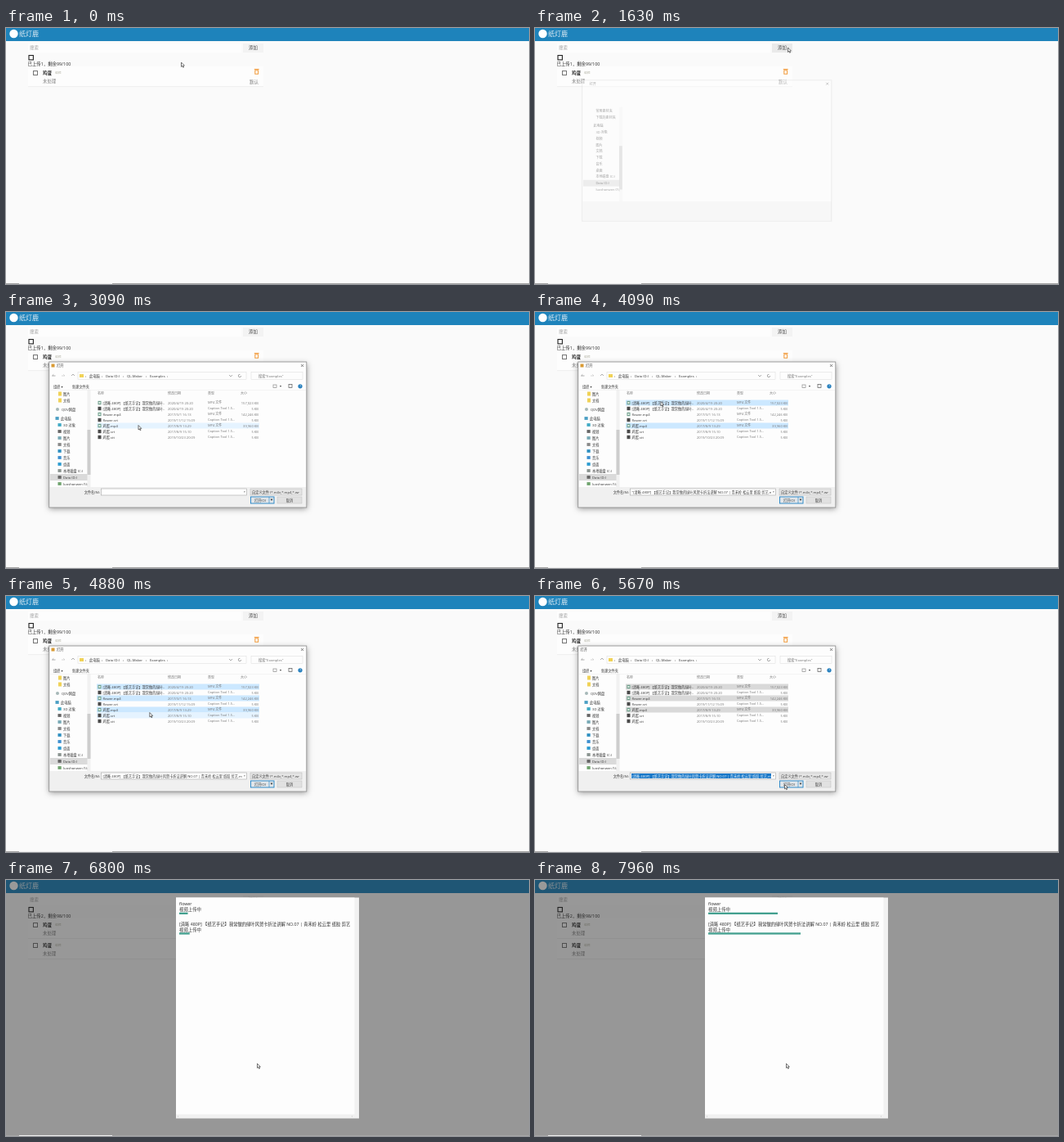
An HTML page with a canvas that plays this animation: 640 px wide and 313 px high, repeating every 8 s.

```html
<!DOCTYPE html>
<html lang="zh">
<head>
<meta charset="utf-8">
<style>
html, body { margin: 0; width: 100%; height: 100%; overflow: hidden; background: #fafafa; }
canvas { display: block; width: 100vw; height: 100vh; }
</style>
</head>
<body>
<canvas id="stage" width="640" height="313"></canvas>
<script>
const ctx = document.getElementById('stage').getContext('2d');
const LOOP = 8000;
const PAGE = '#fafafa', INK = '#3a3a3a', SOFT = '#777', TEAL = '#43a08f', ORANGE = '#f29a38';
const FONT = '"Open Sans", "Noto Sans CJK SC", "Noto Sans CJK", sans-serif';
const TITLE = '[清晰 480P] 【纸艺手记】我常做的绿叶风贺卡折法讲解 NO.07 | 青禾岭 松云里 纸胶 剪艺';

// time, x, y of the pointer tip
const PATH = [
  [40, 214.5, 42], [500, 306, 23], [1080, 306, 23], [1130, 309.5, 24],
  [2130, 309.5, 24], [2880, 162, 138.5], [3250, 162, 138.5], [3720, 154, 109],
  [4050, 154, 109], [4450, 150, 125], [4700, 150, 125], [5400, 305.5, 230.5],
  [5950, 305.5, 230.5], [6200, 307.5, 224.5]
];
const CLICKS = { egg: 3200, paper: 3900, flower: 4560, open: 5500 };
const SHOW = { start: 1590, end: 1750, filled: 1900, close: 5740 };
const EGG_DONE = 6700;

const clamp = v => Math.max(0, Math.min(1, v));
const span = (t, a, b) => clamp((t - a) / (b - a));
const mix = (a, b, p) => a + (b - a) * p;
const smooth = p => p * p * (3 - 2 * p);

function rect(x, y, w, h, fill) {
  ctx.fillStyle = fill;
  ctx.fillRect(x, y, w, h);
}

function frame(x, y, w, h, color, width = 0.7) {
  ctx.strokeStyle = color;
  ctx.lineWidth = width;
  ctx.strokeRect(x, y, w, h);
}

function line(points, color, width = 0.6) {
  ctx.strokeStyle = color;
  ctx.lineWidth = width;
  ctx.beginPath();
  points.forEach(([x, y]) => ctx.lineTo(x, y));
  ctx.stroke();
}

function dot(x, y, r, fill) {
  ctx.fillStyle = fill;
  ctx.beginPath();
  ctx.arc(x, y, r, 0, Math.PI * 2);
  ctx.fill();
}

// y is the optical middle of the line
function text(s, x, y, size = 4.2, color = INK, align = 'left', weight = 400) {
  ctx.font = `${weight} ${size}px ${FONT}`;
  ctx.textAlign = align;
  ctx.fillStyle = color;
  ctx.fillText(s, x, y + size * 0.37);
}

function clipped(x, y, w, h, draw) {
  ctx.save();
  ctx.beginPath();
  ctx.rect(x, y, w, h);
  ctx.clip();
  draw();
  ctx.restore();
}

function pointerAt(t) {
  if (t <= PATH[0][0]) return PATH[0].slice(1);
  for (let i = 1; i < PATH.length; i++) {
    const [t0, x0, y0] = PATH[i - 1], [t1, x1, y1] = PATH[i];
    if (t < t1) {
      const p = smooth(span(t, t0, t1));
      return [mix(x0, x1, p), mix(y0, y1, p)];
    }
  }
  return PATH[PATH.length - 1].slice(1);
}

function drawPointer([x, y]) {
  const shape = [[0, 0], [0, 5.4], [1.3, 4.3], [2.2, 6.3], [3, 5.9], [2.2, 4], [3.8, 3.9]];
  ctx.beginPath();
  shape.forEach(([dx, dy]) => ctx.lineTo(x + dx, y + dy));
  ctx.closePath();
  ctx.fillStyle = '#fff';
  ctx.fill();
  ctx.strokeStyle = '#444';
  ctx.lineWidth = 0.75;
  ctx.stroke();
}

function drawCard(y) {
  rect(27, y, 288, 25, '#fdfdfd');
  rect(27, y + 24.5, 288, 0.6, '#e4e4e4');
  frame(33.5, y + 5.5, 5, 5, '#757575', 1);
  text('鸡蛋', 45, y + 8, 5.4, '#222', 'left', 700);
  text('编辑', 60, y + 8, 3.8, '#bcbcb0');
  text('未处理', 45, y + 18, 5.4, '#808080');
  frame(304.8, y + 4.8, 3.8, 4.4, ORANGE, 1);
  line([[303.8, y + 3.4], [309.6, y + 3.4]], ORANGE, 1);
  text('默认', 298, y + 19, 5.4, SOFT);
}

function drawPage(t, pointer) {
  rect(0, 0, 640, 312, PAGE);
  rect(0, 0, 640, 16, '#1e83bb');
  dot(9.5, 7, 5.2, '#fff');
  text('纸灯鹿', 16, 7, 8, '#e4eff6');

  rect(27, 19, 261, 11, '#fdfdfd');
  text('搜索', 29, 24.5, 5.4, '#a0a0a0');
  const over = pointer[0] > 290 && pointer[0] < 315 && pointer[1] > 18 && pointer[1] < 30;
  const press = t > 830 && t < 920;
  rect(290, 19, 25, 11, press ? '#dedede' : over ? '#eaeaea' : '#f3f3f3');
  text('添加', 297, 24.5, 5.4, '#484848');

  frame(28, 33.5, 5.4, 5.4, '#222', 1.1);
  const count = t < EGG_DONE ? 1 : 2;
  text(`已上传${count}，剩余${100 - count}/100`, 26.5, 44, 5.4, '#2a2a2a');
  for (let i = 0; i < count; i++) drawCard(47 + i * 25);
}

function drawTaskbarEdge() {
  rect(0, 312, 640, 1, '#a6a6a6');
  rect(16, 312, 114, 1, '#f0f0f0');
}

const PLACES = ['此电脑', '3D 对象', '视频', '图片', '文档', '下载', '音乐', '桌面', '本地磁盘 (C:)', 'Data (D:)', 'luoshanwen (\\\\y'];
const PLACE_TINTS = ['#4b9fc4', '#3fa9c4', '#666', '#77a9b5', '#888', '#2e8fc0', '#3d8fd0', '#2b9bd0', '#8a938f', '#666', '#6fa36d'];

function drawSidebar(filled) {
  const recent = filled ? ['图片', '文档'] : ['常用素材夹', '下载的素材夹'];
  recent.forEach((name, i) => {
    if (filled) rect(64, 97.5 + i * 8, 4, 5, '#f0d257');
    text(name, 70, 100 + i * 8);
  });
  if (filled) {
    dot(63, 119, 2, '#a6b8b8');
    text('QDV网盘', 68, 119);
  }
  const top = filled ? 130 : 119;
  PLACES.forEach((name, i) => {
    const y = top + i * 8, x = i ? 70 : 67;
    if (name.startsWith('Data')) rect(54, y - 4, 46, 8, '#dadada');
    if (filled) rect(x - 6.5, y - 1.9, 4.2, 3.8, PLACE_TINTS[i]);
    clipped(54, y - 4, 46, 8, () => text(name, x, y));
  });
  rect(99.5, 95, 4, 119, '#f1f1f1');
  rect(99.5, 144, 4, 55, '#cdcdcd');
}

const SUBTITLE = 'Caption Tool 1.5...';
const FILES = [
  [TITLE.slice(0, 22) + '...', '2020/4/19 20:20', 'MP4 文件', '157,023 KB', 'paper'],
  [TITLE.slice(0, 22) + '...', '2020/4/19 20:20', SUBTITLE, '5 KB'],
  ['flower.mp4', '2017/3/1 16:13', 'MP4 文件', '142,246 KB', 'flower'],
  ['flower.srt', '2019/11/12 15:09', SUBTITLE, '5 KB'],
  ['鸡蛋.mp4', '2017/8/9 13:29', 'MP4 文件', '39,960 KB', 'egg'],
  ['鸡蛋.srt', '2017/8/9 15:10', SUBTITLE, '5 KB'],
  ['鸡蛋.stt', '2019/10/23 20:09', SUBTITLE, '5 KB']
];

function drawFiles(t, pointer) {
  text('名称', 112, 100, 4, SOFT);
  text('修改日期', 198, 100, 4, SOFT);
  text('类型', 247, 100, 4, SOFT);
  text('大小', 287, 100, 4, SOFT);
  FILES.forEach(([name, date, type, size, key], i) => {
    const y = 111 + i * 7;
    const selected = key && t >= CLICKS[key];
    const hover = pointer[0] > 111 && pointer[0] < 310 && Math.abs(pointer[1] - y) < 3.5;
    if (selected) rect(111, y - 3.5, 199, 7, t < CLICKS.open ? '#cce8ff' : '#d9d9d9');
    else if (hover) rect(111, y - 3.5, 199, 7, '#e5f3ff');
    rect(112.5, y - 2.2, 4, 4.4, key ? '#6f9f8c' : '#4a4a4a');
    if (key) rect(113.5, y - 1, 2, 2, '#e6f0e8');
    clipped(118, y - 4, 76, 8, () => text(name, 118.5, y));
    text(date, 198, y, 4.1, SOFT);
    text(type, 247, y, 4, SOFT);
    text(size, 309, y, 4.1, SOFT, 'right');
  });
}

function fieldValue(t) {
  if (t < CLICKS.egg) return '';
  if (t < CLICKS.paper) return '鸡蛋.mp4';
  const list = `"${TITLE}.mp4" "鸡蛋.mp4"`;
  return t < CLICKS.flower ? list : list.slice(1) + ' "flower.mp4"';
}

function drawToolbar() {
  line([[60.5, 78], [56.5, 78], [58.3, 76.3]], SOFT);
  line([[68, 78], [72, 78], [70.2, 76.3]], '#bcbcbc');
  line([[80, 78], [82, 76], [84, 78]], SOFT);
  frame(88, 73.5, 206, 9, '#dcdcdc', 0.5);
  rect(90, 76, 5, 4, '#f0d257');
  [['›', 97], ['此电脑', 102], ['›', 117], ['Data (D:)', 122], ['›', 143], ['QL-Maker', 148], ['›', 171], ['Examples', 176], ['›', 197]]
    .forEach(([s, x]) => text(s, x, 78));
  line([[273, 77], [275, 79], [277, 77]], SOFT);
  ctx.beginPath();
  ctx.arc(286, 78, 1.7, 0, 5);
  ctx.stroke();
  frame(300, 73.5, 63, 9, '#dcdcdc', 0.5);
  text('搜索"Examples"', 309, 78, 4.2, SOFT);
  text('组织 ▾', 58, 91);
  text('新建文件夹', 81, 91);
  frame(327, 89, 4, 3.5, '#8b8b8b');
  text('▾', 335, 91, 4);
  frame(346, 88.5, 4, 4, '#555');
  dot(360, 90.8, 2.6, '#257fbe');
  text('?', 360, 90.8, 4, '#fff', 'center');
  rect(54, 95, 313, 0.5, '#eaeaea');
}

function drawFooter(t, filled) {
  rect(53.5, 214, 314, 24.5, '#f0f0f0');
  if (!filled) return;
  text('文件名(N):', 115, 220, 4.2, INK, 'right');
  rect(116.5, 216, 178, 8, '#fff');
  const value = fieldValue(t), active = t < CLICKS.open;
  clipped(117, 216, 172, 8, () => {
    if (!active) rect(118, 217, 171, 6, '#1a78c8');
    text(value, 118.5, 220, 4.2, active ? INK : '#e6f2fa');
  });
  frame(116.5, 216, 178, 8, '#a6a6a6', 0.6);
  text('▾', 292, 220, 3.5, SOFT, 'center');
  rect(299, 216, 63, 8, '#e4e4e4');
  frame(299, 216, 63, 8, '#b4b4b4', 0.5);
  clipped(299, 216, 60, 8, () => text('自定义文件 (*.m4v;*.mp4;*.wmv', 301, 220));
  rect(299.5, 226, 28.5, 8, '#e1e6ea');
  frame(299.5, 226, 28.5, 8, '#1f80c4', 0.9);
  line([[322, 226], [322, 234]], '#1f80c4');
  text('打开(O)', 311, 230, 4.2, INK, 'center');
  text('▼', 325, 230, 3, INK, 'center');
  rect(332, 226, 30, 8, '#e1e1e1');
  frame(332, 226, 30, 8, '#bebebe', 0.5);
  text('取消', 347, 230, 4.2, INK, 'center');
}

function drawPicker(t, pointer) {
  if (t < SHOW.start || t >= SHOW.close) return;
  const p = span(t, SHOW.start, SHOW.end), eased = 1 - (1 - p) ** 2;
  const scale = mix(0.943, 1, eased), filled = t >= SHOW.filled;
  ctx.save();
  ctx.globalAlpha = eased;
  ctx.translate(210, 150);
  ctx.scale(scale, scale);
  ctx.translate(-210, -150);
  ctx.save();
  // the shadow settles in only once the window is opaque
  if (p === 1) {
    ctx.shadowColor = 'rgba(40,40,40,.5)';
    ctx.shadowBlur = 7;
    ctx.shadowOffsetY = 1.5;
  }
  rect(53, 61, 315, 178, '#fdfdfd');
  ctx.restore();
  const active = t < CLICKS.open;
  if (active && filled) rect(55.5, 63.5, 4, 4, '#d99a33');
  text('打开', active ? 62 : 55.5, 65.7);
  line([[361, 64], [364, 67]], INK);
  line([[364, 64], [361, 67]], INK);
  drawSidebar(filled);
  if (filled) {
    drawToolbar();
    drawFiles(t, pointer);
  }
  drawFooter(t, filled);
  frame(52.8, 61, 315, 178, p < 1 ? '#d0d0d0' : '#8a8a8a', 0.8);
  ctx.restore();
}

function drawUploads(t) {
  const shown = span(t, SHOW.close, 5870);
  if (!shown) return;
  ctx.save();
  ctx.globalAlpha = shown;
  rect(0, 0, 640, 312, 'rgba(33,33,33,.46)');
  rect(208, 21.5, 224, 270, '#f1f1f1');
  rect(208, 21.5, 218.5, 265, '#fdfdfd');
  text('‹', 210, 288.5, 4, '#999');
  text('›', 423, 288.5, 4, '#999');

  const early = span(t, 5800, EGG_DONE), late = span(t, EGG_DONE, 7960);
  const jobs = [
    ['鸡蛋', mix(0, 215, span(t, 5830, EGG_DONE))],
    ['flower', mix(1, 4, early) + 81 * late],
    [TITLE, mix(1, 4, early) + 109 * late]
  ];
  if (t >= EGG_DONE) jobs.shift();
  jobs.forEach(([name, width], i) => {
    const y = 29 + i * 24.6;
    text(name, 212, y, 5.3, '#2c2c2c');
    text('视频上传中', 212, y + 7.3, 5.4, INK);
    rect(212, y + 10.7, width, 2.3, TEAL);
  });
  ctx.restore();
}

function render() {
  const t = performance.now() % LOOP, pointer = pointerAt(t);
  drawPage(t, pointer);
  drawPicker(t, pointer);
  drawUploads(t);
  drawTaskbarEdge();
  drawPointer(pointer);
  requestAnimationFrame(render);
}
render();
</script>
</body>
</html>
```
